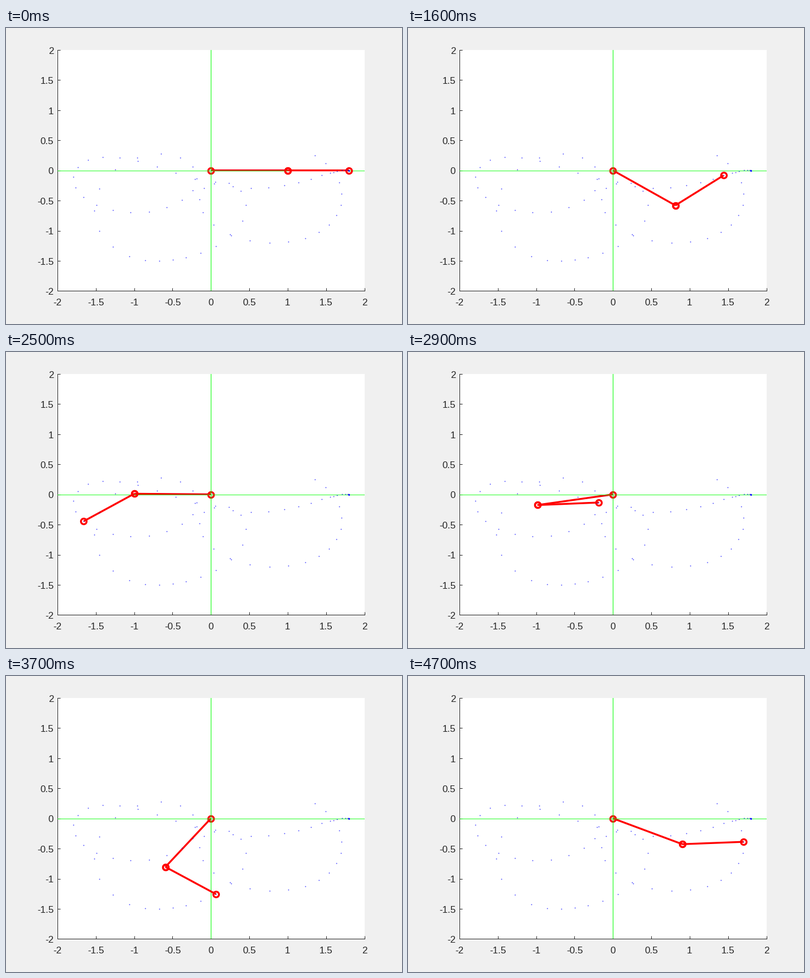
Write a matplotlib script that moves like this. It is 700 px wide and 525 px high and loops after 4.8 s.

```python
import numpy as np
import matplotlib.pyplot as plt
from matplotlib.animation import FuncAnimation

W, H, PX = 700, 525, 0.72          # stage size, points per pixel at 100 dpi
L1, L2 = 1.0, 0.8
FRAMES, START, GAP = 48, 10, 3     # the arm is released at START
INK = "#262626"
plt.rcParams["font.family"] = "Liberation Sans"

# Key angles of the two links in degrees, GAP frames apart
UPPER = [0, -4.3, -35.5, -92.5, -149, -180.6, -180.5,
         -145, -135, -126.4, -74, -27.3, -24.5, -24.7]
LOWER = [0, 5.4, 38.4, 65.6, 114.5, 214.7, 321,
         460, 603.6, 685.6, 826, 961.3, 1055.5, 1136]


def spline(keys):
    """Smooth curve through evenly spaced keys: at rest first, free at the end."""
    y = np.array(keys, float)
    n = len(y)
    a = 4 * np.eye(n) + np.eye(n, k=1) + np.eye(n, k=-1)
    b = np.zeros(n)
    b[1:-1] = 3 * (y[2:] - y[:-2])
    a[0, :2] = 1, 0
    a[-1, -1] = 2
    b[-1] = 3 * (y[-1] - y[-2])
    m = np.linalg.solve(a, b)

    def curve(k):
        s = np.clip((np.asarray(k) - START) / GAP, 0, n - 1)
        i = np.minimum(s.astype(int), n - 2)
        u = s - i
        v = 1 - u
        return (v * v * ((1 + 2 * u) * y[i] + u * m[i])
                + u * u * ((1 + 2 * v) * y[i + 1] - v * m[i + 1]))

    return curve


upper_angle, lower_angle = spline(UPPER), spline(LOWER)


def pose(k):
    """Elbow and free end as complex numbers."""
    elbow = L1 * np.exp(1j * np.radians(upper_angle(k)))
    return elbow, elbow + L2 * np.exp(1j * np.radians(lower_angle(k)))


fig = plt.figure(figsize=(W / 100, H / 100), dpi=100, facecolor="#f0f0f0")
ax = fig.add_axes([0.13, 58.53 / H, 0.775, 0.815])
ax.set(xlim=(-2, 2), ylim=(-2, 2))
ticks = np.arange(-2, 2.1, 0.5)
ax.set_xticks(ticks, [])
ax.set_yticks(ticks, [])
ax.tick_params(direction="in", length=5.4 * PX, width=PX, color=INK)
for name, spine in ax.spines.items():
    spine.set(visible=name in ("left", "bottom"), linewidth=PX, color=INK)


def label(x, y, text, ha):
    fig.text(x / W, 1 - y / H, text, ha=ha, va="baseline",
             size=17 * PX, color=INK)


for v in ticks:
    text = f"{v:g}"
    label(362.25 + 135.625 * v, 492, text, "center")
    label(84.2, 259.5 - 106.97 * v, text, "right")


def link(z):
    return ax.plot([], [], "o-", color="red", lw=3.3 * PX, ms=10 * PX,
                   mew=3.3 * PX, mfc="none", solid_capstyle="butt",
                   snap=False, zorder=z)[0]


upper = link(2)
ax.axhline(0, color="lime", lw=PX, alpha=0.85, zorder=3)
ax.axvline(0, color="lime", lw=PX, zorder=3)
lower = link(4)
trail = pose(np.arange(0, FRAMES + 1.5, 0.5))[1]
ax.plot(trail.real, trail.imag, "o", color="blue", alpha=0.75,
        ms=1.8 * PX, mew=0, zorder=5)


def draw(k):
    elbow, tip = pose(k)
    upper.set_data([0, elbow.real], [0, elbow.imag])
    lower.set_data([elbow.real, tip.real], [elbow.imag, tip.imag])
    return upper, lower


anim = FuncAnimation(fig, draw, frames=FRAMES, interval=100,
                     repeat=True, repeat_delay=0)
plt.show()
```
